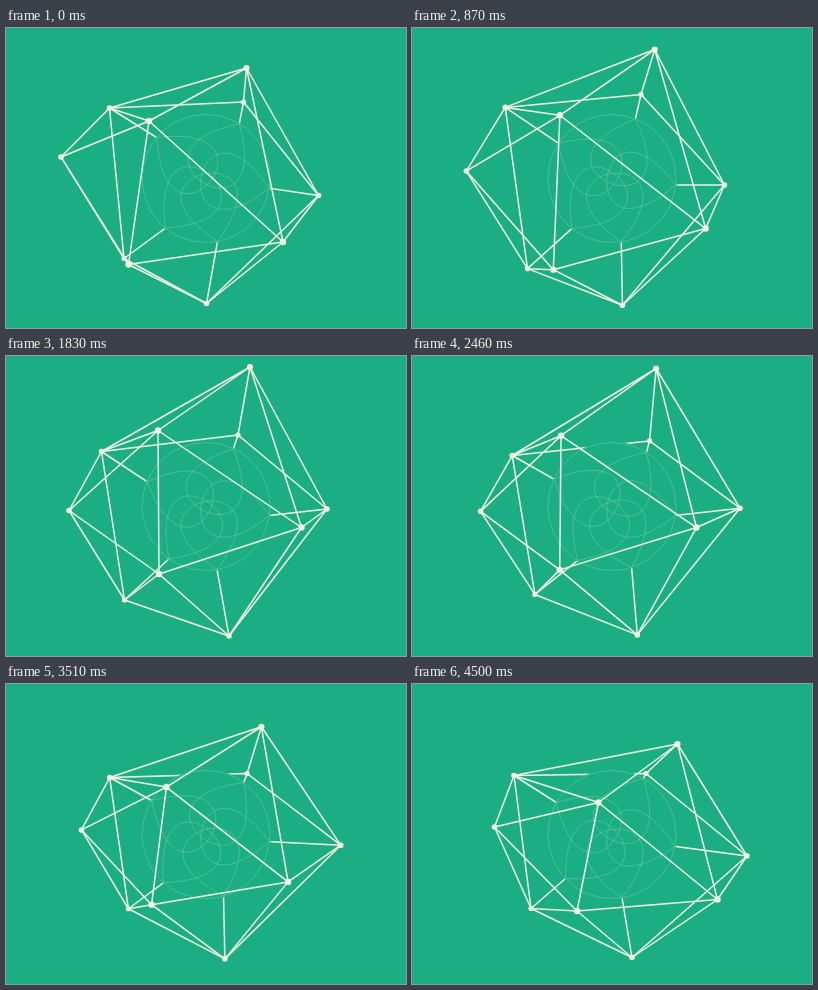
An HTML page with a canvas that plays this animation: 400x300 px, repeating every 4.53 s.

```html
<!DOCTYPE html>
<html lang="en">
<head>
<meta charset="utf-8">
<title>Wireframe</title>
<style>
html, body { margin: 0; width: 100%; height: 100%; overflow: hidden; background: #1bae82; }
canvas { display: block; }
</style>
</head>
<body>
<canvas id="stage" width="400" height="300"></canvas>
<script>
const ctx = document.getElementById('stage').getContext('2d');
const LOOP = 4530, STEP = 30;
const GREEN = '#1bae82', CREAM = '#f1f2e2';
const CENTER = { x: 200, y: 150.5 }, HIDE_R = 65, RIM_R = 64;

// Key poses of each corner: radius, then x and y at TIMES.
const TIMES = [0, 480, 1290, 1830, 3090, 3930, 4500];
const CORNERS = {
  A: [3.1, [240.5, 240.5, 245, 244, 248, 262.5, 265.5], [40, 28.5, 16, 11, 31, 53.5, 60]],
  B: [2.8, [103.5, 98.5, 90, 95.5, 103, 103.5, 102], [80, 79, 83, 95.5, 97, 90.5, 91.5]],
  C: [3.2, [143, 143.5, 152.5, 152, 151, 172, 186.5], [93, 87.5, 86, 74.5, 94, 111.5, 118.5]],
  D: [2.8, [55, 53.5, 57, 63, 73, 78, 82.5], [129, 135.5, 150.5, 154.5, 152, 141, 143]],
  E: [2.6, [237.5, 233, 227, 232, 241, 239.5, 234], [74, 69.5, 67, 79, 87, 91, 89.5]],
  F: [2.8, [312.5, 312.5, 314, 321, 333, 335.5, 335], [167.5, 162, 153, 153, 154.5, 168, 172]],
  G: [3.2, [277, 285.5, 299.5, 295.5, 277.5, 290.5, 305.5], [214, 206.5, 191.5, 171.5, 185.5, 209.5, 215.5]],
  H: [2.8, [200.5, 206, 215.5, 223, 223, 216, 220], [275.5, 277.5, 277, 280, 276, 274, 273.5]],
  I: [2.6, [118, 116.5, 115.5, 118.5, 125, 119.5, 119], [230.5, 237.5, 242.5, 244, 230, 221.5, 224.5]],
  J: [3.2, [122.5, 130, 152, 153, 143.5, 151, 165], [236.5, 239.5, 238.5, 218, 219, 223, 227]]
};
const BACK = 'BE BI EF FH HI KB KE KF KH KI'.split(' ');
const FRONT = 'AB AC AE AF AG BC BD CD CG CJ DI DJ FG GH GJ HJ IJ'.split(' ');

function slope(v, i) {
  const rate = k => (v[k + 1] - v[k]) / (TIMES[k + 1] - TIMES[k]);
  if (i === 0) return rate(0);
  if (i === TIMES.length - 1) return rate(i - 1);
  const before = TIMES[i] - TIMES[i - 1], after = TIMES[i + 1] - TIMES[i];
  return (rate(i - 1) * after + rate(i) * before) / (before + after);
}

// Smooth cubic through the key values.
function sample(v, t) {
  let i = 0;
  while (i < TIMES.length - 2 && t > TIMES[i + 1]) i++;
  const span = TIMES[i + 1] - TIMES[i], u = (t - TIMES[i]) / span, w = 1 - u;
  return w * w * (1 + 2 * u) * v[i] + u * u * (3 - 2 * u) * v[i + 1]
    + u * w * span * (w * slope(v, i) - u * slope(v, i + 1));
}

function pose(t) {
  const p = {};
  for (const name in CORNERS) {
    const [r, xs, ys] = CORNERS[name];
    p[name] = { r, x: sample(xs, t), y: sample(ys, t) };
  }
  // The top corner lingers near its peak before falling.
  const u = Math.min(1, Math.max(0, (t - 1830) / 1260));
  p.A.y -= 150 * u ** 3 * (1 - u) ** 2;
  p.K = {
    x: 211 + 11 * Math.cos(t * 2 * Math.PI / 3000),
    y: 154 + 13 * Math.exp(-(((t - 2050) / 950) ** 2))
  };
  return p;
}

function strokeEdges(edges, p) {
  ctx.beginPath();
  for (const [a, b] of edges) {
    ctx.moveTo(p[a].x, p[a].y);
    ctx.lineTo(p[b].x, p[b].y);
  }
  ctx.stroke();
}

function disc(x, y, r) {
  ctx.beginPath();
  ctx.arc(x, y, r, 0, 2 * Math.PI);
}

// Where the line from an outer corner to the inner one meets the ball.
function entry(from, to) {
  const dx = to.x - from.x, dy = to.y - from.y;
  const fx = from.x - CENTER.x, fy = from.y - CENTER.y;
  const a = dx * dx + dy * dy, b = fx * dx + fy * dy;
  const c = fx * fx + fy * fy - RIM_R * RIM_R;
  const s = (-b - Math.sqrt(Math.max(0, b * b - a * c))) / a;
  return { x: from.x + s * dx, y: from.y + s * dy };
}

function petal(s) {
  const ux = (CENTER.x - s.x) / RIM_R, uy = (CENTER.y - s.y) / RIM_R;
  const tip = side => [s.x + 92 * ux - side * 98 * uy, s.y + 92 * uy + side * 98 * ux];
  ctx.beginPath();
  ctx.moveTo(s.x, s.y);
  ctx.bezierCurveTo(...tip(1), ...tip(-1), s.x, s.y);
  ctx.stroke();
}

function draw(t) {
  const p = pose(t);
  ctx.fillStyle = GREEN;
  ctx.fillRect(0, 0, 400, 300);
  ctx.strokeStyle = CREAM;
  ctx.lineWidth = 1.5;
  strokeEdges(BACK, p);

  disc(CENTER.x, CENTER.y, HIDE_R);
  ctx.fill();
  ctx.globalAlpha = 0.3;
  ctx.lineWidth = 0.7;
  disc(CENTER.x, CENTER.y, RIM_R);
  ctx.stroke();
  for (const name of 'BEFHI') petal(entry(p[name], p.K));
  ctx.globalAlpha = 1;

  ctx.lineWidth = 1.5;
  strokeEdges(FRONT, p);
  ctx.fillStyle = CREAM;
  for (const name in CORNERS) {
    disc(p[name].x, p[name].y, p[name].r);
    ctx.fill();
  }
}

const start = performance.now();
function frame() {
  const t = (performance.now() - start) % LOOP;
  draw(Math.floor(t / STEP) * STEP);
  requestAnimationFrame(frame);
}
frame();
</script>
</body>
</html>
```
